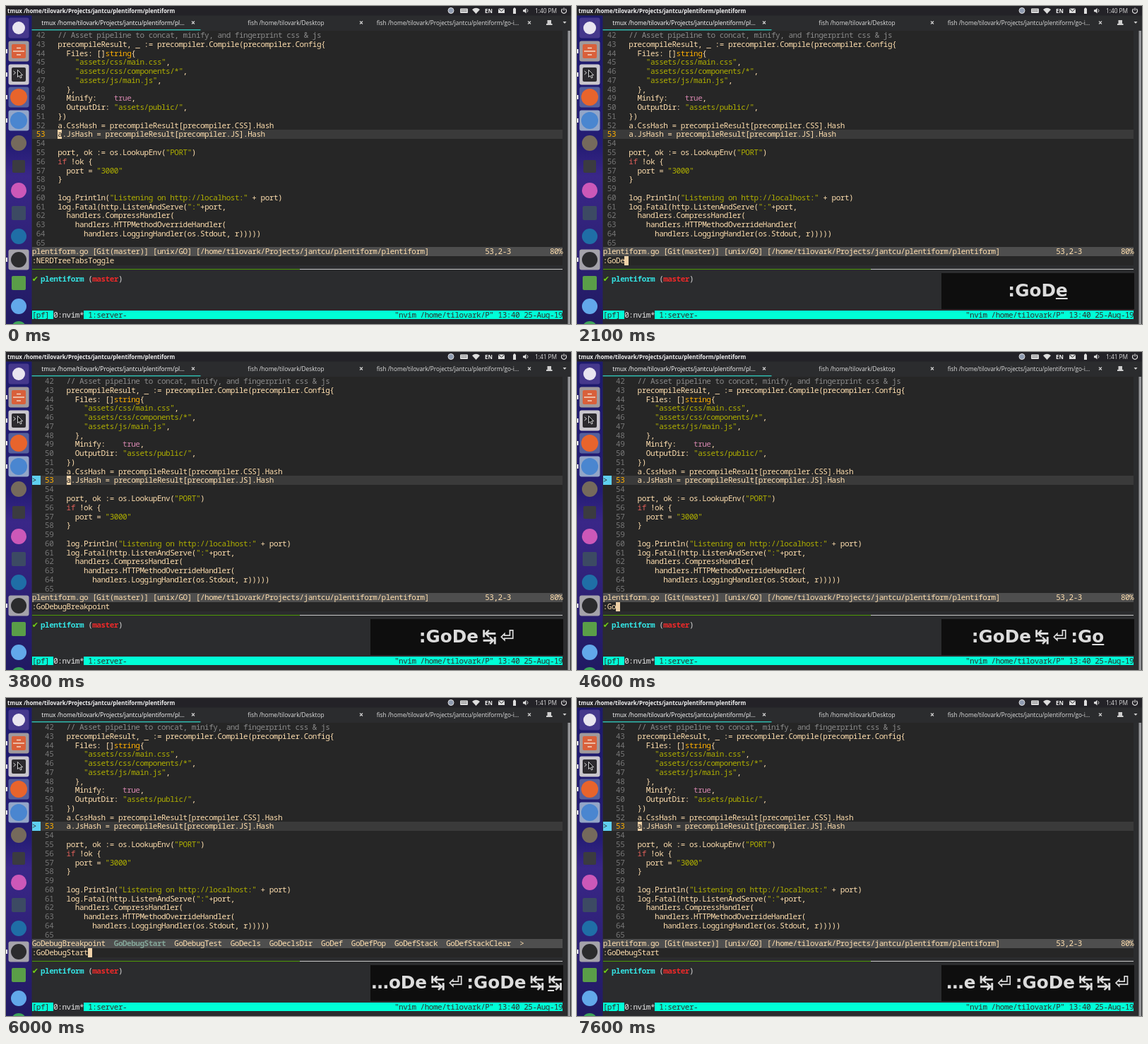
Animation, 800 px wide and 450 px high, one loop 8 s. Source, as an HTML page:

```html
<!DOCTYPE html>
<html lang="en">
<head>
<meta charset="utf-8">
<title>Terminal session</title>
<style>
  html, body { margin: 0; width: 100%; height: 100%; overflow: hidden; background: #2b2c2e; }
  #stage { position: relative; width: 800px; height: 450px; overflow: hidden; background: #2b2c2e; }
  #stage div { position: absolute; white-space: pre; }
  svg { position: absolute; left: 0; top: 0; }
  .ui { font-family: "Open Sans", "Noto Sans", sans-serif; fill: #dedede; font-size: 8.3px; }
  .ui .b { font-weight: 700; font-size: 7.9px; fill: #f2f2f2; }
  .mid { text-anchor: middle; }
  .cell {
    --cell: 6.11px;
    font: 11px/12.76px "Noto Sans Mono", monospace;
    letter-spacing: calc(var(--cell) - 6.6px);
    height: 12.76px; color: #ffdfaf;
  }
  .num { color: #767676; }
  .num.on { color: #ffaf00; }
  .note { color: #8a8a8a; }
  .str { color: #afaf00; }
  .bool { color: #d787af; }
  .type { color: #ffaf00; }
  .word { color: #e0605a; }
  .pick { color: #83a598; font-weight: 700; }
  #sign { background: #5fd0f0; color: #333; }
  #cursor { background: #f0d2a8; color: #262626; }
  #keys {
    left: 516px; top: 377.5px; width: 273px; height: 51px; background: #0e0e0e; color: #dcdcdc;
    font: bold 24.7px/50px "DejaVu Sans", sans-serif; text-align: center;
  }
  #keys u { text-decoration-thickness: 2px; text-underline-offset: 2px; }
</style>
</head>
<body>
<div id="stage">
  <svg class="ui" width="800" height="450">
    <defs>
      <linearGradient id="wall" x2="0" y2="1">
        <stop offset="0" stop-color="#1d1a6c"/>
        <stop offset=".42" stop-color="#241c74"/>
        <stop offset=".52" stop-color="#3a2788"/>
        <stop offset="1" stop-color="#201a62"/>
      </linearGradient>
    </defs>
    <rect width="800" height="13.5" fill="#232227"/>
    <rect y="13.5" width="36.5" height="437" fill="url(#wall)"/>
    <rect x="795.5" y="35" width="3.5" height="415" fill="#96979a"/>
    <g id="dock"></g>

    <text class="b" x="2" y="9.5">tmux /home/tilovark/Projects/jantcu/plentiform/plentiform</text>
    <circle cx="630" cy="6.5" r="4" fill="#8f9bb0" stroke="#dedede"/>
    <rect x="643" y="3.5" width="11" height="6.5" rx="1"/>
    <path d="M644.5 5.5h8M644.5 7.5h8" stroke="#242426" stroke-width=".8" stroke-dasharray="1 .8"/>
    <path d="M660 5q5.5-4.500 11 0l-5.500 6z"/>
    <path d="M697 3.500h9v6.500h-9z"/>
    <path d="M697 3.500l4.500 4 4.500-4" fill="none" stroke="#242426"/>
    <path d="M718 3.500h1v-1h2v1h1v7.500h-4z"/>
    <path d="M732 5.200h2l2.500-2.400v7.800l-2.500-2.400h-2z"/>
    <path d="M738 4.500q2 2 0 4.300" fill="none" stroke="#dedede" stroke-width=".9"/>
    <text x="678" y="9.500" class="b">EN</text>
    <text id="clock" x="749" y="9.500"></text>
    <path d="M788 4a3.500 3.500 0 1 0 4 0M790 2.500v4" fill="none" stroke="#dedede" stroke-width="1.200"/>

    <g class="mid">
      <text x="151.500" y="26.500" font-size="8.400" fill="#fff">tmux /home/tilovark/Projects/jantcu/plentiform/pl…</text>
      <text x="396.500" y="26.500">fish /home/tilovark/Desktop</text>
      <text x="625.500" y="26.500">fish /home/tilovark/Projects/jantcu/plentiform/go-i…</text>
    </g>
    <path d="M263 21.500l4 4m0-4l-4 4M501 21.500l4 4m0-4l-4 4M739 21.500l4 4m0-4l-4 4" stroke="#cfcfcf" stroke-width="1.100"/>
    <path d="M766.500 20h5.500v5h1.500v2h-8.500v-2h1.500z" fill="#cfcfcf"/>
    <path d="M788.500 22h5l-2.500 3z" fill="#cfcfcf"/>
    <rect x="36.500" y="33" width="239" height="1.500" fill="#2fb8ac"/>
  </svg>
  <div id="term"></div>
  <div id="keys"></div>
</div>
<script>
const LOOP = 8000, CELL = 6.11, ROW = 12.76, LEFT = 36.7, TOP = 35.1, COLS = 123;
const FIRST = 42, CURRENT = 53, STATUS = 24, CMD = 25;
const NUM_COL = 1, CODE_COL = 6, SIGN_COLS = 2;
const $ = id => document.getElementById(id);

const code = `// Asset pipeline to concat, minify, and fingerprint css & js
precompileResult, _ := precompiler.Compile(precompiler.Config{
  Files: []string{
    "assets/css/main.css",
    "assets/css/components/*",
    "assets/js/main.js",
  },
  Minify:    true,
  OutputDir: "assets/public/",
})
a.CssHash = precompileResult[precompiler.CSS].Hash
a.JsHash = precompileResult[precompiler.JS].Hash

port, ok := os.LookupEnv("PORT")
if !ok {
  port = "3000"
}

log.Println("Listening on http://localhost:" + port)
log.Fatal(http.ListenAndServe(":"+port,
  handlers.CompressHandler(
    handlers.HTTPMethodOverrideHandler(
      handlers.LoggingHandler(os.Stdout, r)))))
`.split('\n');

function place(el, row, col) {
  el.style.left = LEFT + col * CELL + 'px';
  el.style.top = TOP + row * ROW + 'px';
}

function put(row, col, html = '', cls = '', id = '') {
  const el = document.createElement('div');
  el.className = 'cell ' + cls;
  el.id = id;
  el.innerHTML = html;
  place(el, row, col);
  $('term').append(el);
  return el;
}

function bar(row, col, cols, color, rows = 1) {
  const el = put(row, col);
  el.style.width = cols * CELL + 'px';
  el.style.height = rows * ROW + 'px';
  el.style.background = color;
  return el;
}

const kinds = ['note', 'str', 'bool', 'type', 'word'];
const paint = line => line.replace(/&/g, '&amp;').replace(
  /(\/\/.*)|("[^"]*")|\b(true)\b|\b(string)\b|\b(if)\b/g,
  (all, ...groups) => `<span class="${kinds[groups.findIndex(Boolean)]}">${all}</span>`);

const tint = (color, text) => `<span style="color:${color}">${text}</span>`;

// Editor pane
bar(0, 0, COLS, '#262626', 26);
bar(CURRENT - FIRST, 0, COLS, '#3a3a3a');
const numbers = code.map((_, i) =>
  put(i, NUM_COL, FIRST + i, FIRST + i === CURRENT ? 'num on' : 'num'));
const lines = code.map((line, i) => put(i, CODE_COL, paint(line)));
const sign = put(CURRENT - FIRST, 0, '&gt; ', '', 'sign');
sign.style.width = SIGN_COLS * CELL + 'px';
bar(STATUS, 0, COLS, '#4e4e4e');
const status = put(STATUS, 0);
const cmd = put(CMD, 0);
const cursor = put(0, 0, '', '', 'cursor');
cursor.style.width = CELL + 'px';

// Shell pane and tmux bar
for (const [col, cols, color] of [[0, 62, '#4e9a06'], [62, 61, '#c8c8c8']]) {
  bar(26.4, col, cols, color, .09);
}
put(27, 0, tint('#73d216', '✔'));
put(27, 2, tint('#34e2e2', '<b>plentiform</b>'));
put(27, 13, tint('#d8d8d8', '(') + tint('#ef2929', '<b>master</b>') + tint('#d8d8d8', ')'));
bar(31, 0, COLS, '#00ffd7');
bar(31, 5, 7, '#2b2c2e');
put(31, 0, tint('#2b2c2e', '[pf]'));
put(31, 5, tint('#e8e8e8', '0:nvim*'));
put(31, 13, tint('#2b2c2e', '1:server-'));
put(31, 84, tint('#2b2c2e', '"nvim /home/tilovark/P" 13:40 25-Aug-19'));

// Dock: centre y, shape, colour, size, tile, running
const apps = [
  [31, 'o', '#e9e5f0', 9, '#45388c', 0],
  [64, 's', '#d9603b', 10, '#a09a9c', 1],
  [97, 's', '#2c2a2e', 10, '#c9c6cc', 1],
  [129, 'o', '#e8642c', 12, '#56609c', 1],
  [162, 'o', '#4a86d0', 12, '#93a6c8', 1],
  [194, 'o', '#756a5c', 11, '', 0],
  [227, 's', '#3b3b40', 9, '', 0],
  [261, 'o', '#cc58b8', 11, '', 0],
  [293, 's', '#3c4a63', 10, '', 0],
  [326, 'o', '#1f6ea6', 11, '', 0],
  [359, 'o', '#2b2b2d', 11, '#a5a3aa', 1],
  [392, 's', '#5a9e48', 10, '', 0],
  [425, 'o', '#62a8ea', 11, '', 0],
  [457, 'o', '#3fa45a', 11, '', 0]
];
$('dock').innerHTML = apps.map(([y, shape, color, r, tile, on]) =>
  (tile && `<rect x="3.5" y="${y - 14.5}" width="29" height="29" rx="3" fill="${tile}"/>`) +
  (shape === 'o'
    ? `<circle cx="18" cy="${y}" r="${r}" fill="${color}"/>`
    : `<rect x="${18 - r}" y="${y - r}" width="${2 * r}" height="${2 * r}" rx="2" fill="${color}"/>`) +
  (on ? `<rect y="${y - 3}" width="2" height="6" fill="#eee"/>` : '')
).join('') + `
  <path d="M10 64h16M15 59.500h6M15 69h6" stroke="#f3d9c8" stroke-width="1.500"/>
  <path d="M10.500 92l3 2.500-3 2.500" fill="none" stroke="#ddd"/>
  <path d="M16.500 90.500v10l2.300-2 1.600 3.500 1.700-.8-1.600-3.400h3z" fill="#111" stroke="#fff" stroke-width=".8"/>`;

const statusHtml = 'plentiform.go [Git(master)] [unix/GO] [/home/tilovark/Projects/jantcu/plentiform/plentiform]'
  .padEnd(105) + '53,2-3'.padEnd(15) + '80%';
const matches = ['Breakpoint', 'Start', 'Test'].map(s => 'GoDebug' + s).concat(
  'GoDecls GoDeclsDir GoDef GoDefPop GoDefStack GoDefStackClear'.split(' '));
const menuHtml = pick =>
  matches.map(m => m === pick ? `<span class="pick">${m}</span>` : m).join('  ') + '  &gt;';

// Start time, command line, mode, shown keys, last key underlined
const NORMAL = 0, TYPING = 1, MENU = 2;
const BREAK = ':GoDebugBreakpoint', START = ':GoDebugStart', ONCE = ':GoDe ↹ ⏎';
const steps = [
  [0, ':NERDTreeTabsToggle', NORMAL, '', 0],
  [900, ':', TYPING, '', 0],
  [1000, ':', TYPING, ':', 1],
  [1300, ':G', TYPING, ':G', 1],
  [1500, ':Go', TYPING, ':Go', 1],
  [1800, ':GoD', TYPING, ':GoD', 1],
  [1900, ':GoDe', TYPING, ':GoDe', 1],
  [2200, BREAK, MENU, ':GoDe ↹', 1],
  [2700, BREAK, MENU, ':GoDe ↹', 0],
  [3300, BREAK, NORMAL, ONCE, 1],
  [3700, BREAK, NORMAL, ONCE, 0],
  [4100, ':', TYPING, ONCE + ' :', 1],
  [4400, ':G', TYPING, ONCE + ' :G', 1],
  [4600, ':Go', TYPING, ONCE + ' :Go', 1],
  [4800, ':GoD', TYPING, ONCE + ' :GoD', 1],
  [4900, ':GoDe', TYPING, ONCE + ' :GoDe', 1],
  [5200, BREAK, MENU, ONCE + ' :GoDe ↹', 1],
  [5600, BREAK, MENU, ONCE + ' :GoDe ↹', 0],
  [5700, START, MENU, '…oDe ↹ ⏎ :GoDe ↹ ↹', 1],
  [6100, START, MENU, '…oDe ↹ ⏎ :GoDe ↹ ↹', 0],
  [6400, START, NORMAL, '…e ↹ ⏎ :GoDe ↹ ↹ ⏎', 1],
  [6700, START, NORMAL, '…e ↹ ⏎ :GoDe ↹ ↹ ⏎', 0]
];
const MARKED = 3300, MINUTE = 3500;

function showKeys(text, hot) {
  const keys = text.replace(/ /g, '\u2009');
  $('keys').style.display = keys ? 'block' : 'none';
  $('keys').innerHTML = hot ? `${keys.slice(0, -1)}<u>${keys.slice(-1)}</u>` : keys;
}

let shown = '';
function draw(t) {
  const step = steps.findLast(s => s[0] <= t);
  const marked = t >= MARKED, late = t >= MINUTE;
  const key = [step[0], marked, late].join();
  if (key === shown) return;
  shown = key;

  const [, text, mode, keys, hot] = step;
  const shift = marked ? SIGN_COLS : 0;
  numbers.forEach((el, i) => place(el, i, NUM_COL + shift));
  lines.forEach((el, i) => place(el, i, CODE_COL + shift));
  sign.style.display = marked ? 'block' : 'none';
  status.innerHTML = mode === MENU ? menuHtml(text.slice(1)) : statusHtml;
  cmd.textContent = text;
  cursor.textContent = mode === NORMAL ? 'a' : '';
  if (mode === NORMAL) place(cursor, CURRENT - FIRST, CODE_COL + shift);
  else place(cursor, CMD, text.length);
  $('clock').textContent = late ? '1:41 PM' : '1:40 PM';
  showKeys(keys, hot);
}

const origin = performance.now();
function tick() {
  draw((performance.now() - origin) % LOOP);
  requestAnimationFrame(tick);
}
tick();
</script>
</body>
</html>
```
